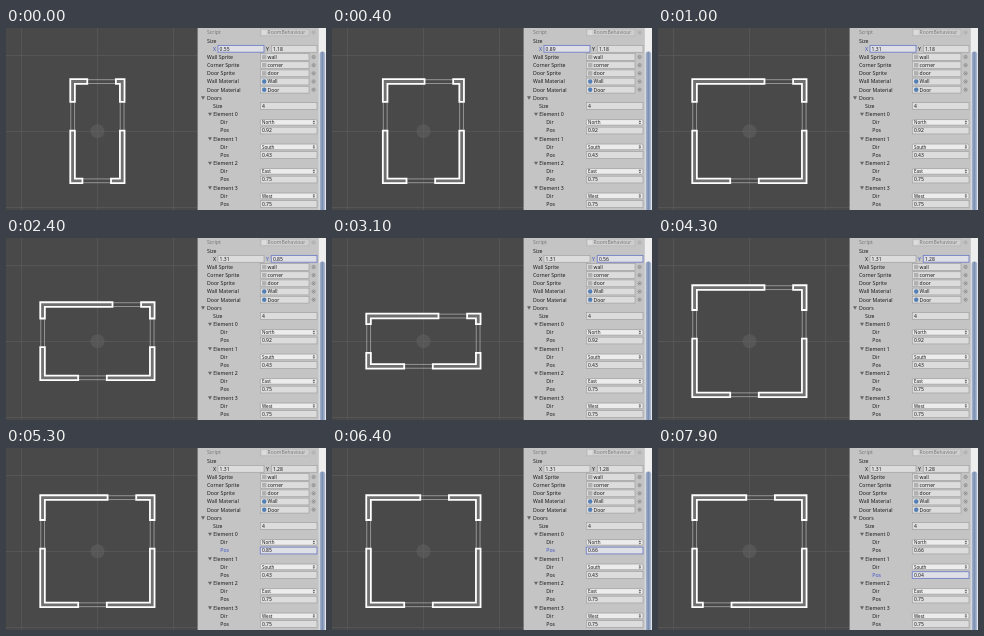
These frames come from a looping animation (320 px wide and 182 px high, 8000 ms). An HTML page:

```html
<!DOCTYPE html>
<html lang="en">
<head>
<meta charset="utf-8">
<title>Room editor</title>
<style>
html, body { margin: 0; height: 100%; overflow: hidden; background: #494949; }
svg { display: block; width: 320px; height: 182px; }
text { font: 5.2px "Noto Sans", "Open Sans", sans-serif; fill: #1c1c1c; }
text.value { font-size: 5px; }
text.mini { font-size: 4.5px; }
text.active { fill: #4458c8; }
.dim { opacity: .45; }
.field { fill: #dcdcdc; stroke: #9c9c9c; stroke-width: .6; }
.popup { fill: #ececec; stroke: #909090; stroke-width: .6; }
.focus { fill: #dfdfe6; stroke: #7b88c6; stroke-width: 1; }
.arrow { fill: #666; }
</style>
</head>
<body>
<svg id="stage" viewBox="0 0 320 182">
  <defs>
    <linearGradient id="thumb">
      <stop offset="0" stop-color="#a9b7d0"/>
      <stop offset=".5" stop-color="#7d8fb0"/>
      <stop offset="1" stop-color="#b4c3da"/>
    </linearGradient>
  </defs>
  <rect width="320" height="182" fill="#494949"/>
  <path d="M15.5 0V182M91.5 0V182M167.5 0V182M0 27.5H192M0 103.5H192M0 179.5H192" stroke="#595959" stroke-width=".8"/>
  <circle cx="91.5" cy="103.3" r="7" fill="#646464" opacity=".5"/>
  <path id="doors" fill="none" stroke="#a8a8a8" stroke-width=".8"/>
  <path id="walls" fill="#707070" stroke="#fff" stroke-width="1.8"/>
  <rect x="191.6" width="129" height="182" fill="#c4c4c4"/>
  <rect x="312.8" width="7.2" height="182" fill="#eee"/>
  <rect x="313.6" y="23.5" width="5.6" height="170" rx="2.8" fill="url(#thumb)"/>
  <g id="panel"></g>
</svg>
<script>
const LOOP = 8000, STEP = 100, RIGHT = 311;
const $ = id => document.getElementById(id);
const rowY = i => 4.5 + 8.17 * i;

function add(tag, attrs, content = '') {
  const el = document.createElementNS('http://www.w3.org/2000/svg', tag);
  for (const k in attrs) el.setAttribute(k, attrs[k]);
  el.textContent = content;
  return $('panel').appendChild(el);
}
const label = (x, row, s, cls = '') => add('text', { x, y: rowY(row) + 1.9, class: cls }, s);
const box = (x, row, right, cls = 'field', h = 6.8) =>
  add('rect', { x, y: rowY(row) - h / 2, width: right - x, height: h, rx: cls === 'popup' ? 1.5 : 0, class: cls });
const foldout = (x, row) => add('path', { d: `M${x} ${rowY(row) - 1.5}h4l-2 3.4z`, class: 'arrow' });

function input(x, row, right, value, name) {
  const rect = box(x, row, right);
  return { rect, name, text: label(x + 1.6, row, value, 'value') };
}

function objectRow(row, name, value, color, round = 0, cls = '') {
  label(201, row, name, cls);
  box(254.3, row, 303, 'field ' + cls);
  add('rect', { x: 256, y: rowY(row) - 2.2, width: 4.4, height: 4.4, rx: round, fill: color, class: cls });
  label(261.6, row, value, 'value ' + cls);
  add('circle', { cx: 307.6, cy: rowY(row), r: 1.6, fill: 'none', stroke: '#777', 'stroke-width': .6, class: cls });
  add('circle', { cx: 307.6, cy: rowY(row), r: .6, fill: '#777', class: cls });
}

objectRow(0, 'Script', 'RoomBehaviour', '#eee', 0, 'dim');
label(201, 1, 'Size');
const sizeX = input(212, 2, 258, '', label(207, 2, 'X'));
const sizeY = input(265.3, 2, RIGHT, '', label(260, 2, 'Y'));
objectRow(3, 'Wall Sprite', 'wall', '#b0b0b0');
objectRow(4, 'Corner Sprite', 'corner', '#b0b0b0');
objectRow(5, 'Door Sprite', 'door', '#b0b0b0');
objectRow(6, 'Wall Material', 'Wall', '#527fb5', 2.2);
objectRow(7, 'Door Material', 'Door', '#527fb5', 2.2);
foldout(195, 8);
label(201, 8, 'Doors');
label(207, 9, 'Size');
input(254.3, 9, RIGHT, '4');

const posFields = ['North', 'South', 'East', 'West'].map((dir, i) => {
  const row = 10 + 3 * i, y = rowY(row + 1);
  foldout(202, row);
  label(207.3, row, 'Element ' + i);
  label(214.3, row + 1, 'Dir');
  box(254.3, row + 1, RIGHT, 'popup', 5.6);
  label(256, row + 1, dir, 'mini');
  add('path', { d: `M306.6 ${y - .4}h2.6l-1.3 -1.7zM306.6 ${y + .4}h2.6l-1.3 1.7z`, class: 'arrow' });
  return input(254.3, row + 2, RIGHT, '0.75', label(214.3, row + 2, 'Pos'));
});
const fields = [sizeX, sizeY, posFields[0], posFields[1]];

// Each track is a list of [time, value], joined by straight lines
const tracks = [
  [[0, .55], [900, 1.31]],
  [[1700, 1.18], [1900, 1.13], [2400, .85], [2900, .54], [3100, .56], [3500, 1.2], [3900, 1.28]],
  [[5200, .92], [5300, .85], [5800, .2], [6100, .35], [6400, .66]],
  [[7500, .43], [7900, .04]]
];
const focusStarts = [0, 1800, 4900, 7400];

function sample(track, t) {
  const i = track.findIndex(k => k[0] > t);
  if (i < 0) return track[track.length - 1][1];
  if (i === 0) return track[0][1];
  const [t0, a] = track[i - 1], [t1, b] = track[i];
  return a + (b - a) * (t - t0) / (t1 - t0);
}

function drawRoom(w, h, north, south) {
  const cx = 91.4, cy = 103.2, unit = 79, thick = 4.6, half = 13.6;
  const hw = w * unit / 2 + 5.4, hh = h * unit / 2 + 5.4;
  const slot = (size, pos) => (pos - .5) * (size * unit - 33.5);
  const n = cx + slot(w, north), s = cx + slot(w, south), side = cy - slot(h, .75);
  let walls = '', doors = '';
  for (const sy of [-1, 1]) {
    const y = cy + sy * hh, yIn = y - sy * thick, mid = sy < 0 ? n : s;
    for (const d of [y - sy * .5, yIn + sy * .3]) doors += `M${mid - half} ${d}h${2 * half}`;
    for (const sx of [-1, 1]) {
      const x = cx + sx * hw, xIn = x - sx * thick;
      const xEnd = mid + sx * (half + .7), yEnd = side + sy * (half + .7);
      walls += `M${x} ${y}H${xEnd}V${yIn}H${xIn}V${yEnd}H${x}Z`;
    }
  }
  for (const sx of [-1, 1])
    for (const inset of [.5, thick - .3])
      doors += `M${cx + sx * (hw - inset)} ${side - half}v${2 * half}`;
  $('walls').setAttribute('d', walls);
  $('doors').setAttribute('d', doors);
}

function frame(now) {
  const t = Math.floor(now % LOOP / STEP) * STEP;
  const values = tracks.map(track => +sample(track, t).toFixed(2));
  const active = focusStarts.filter(start => start <= t).length - 1;
  fields.forEach((f, i) => {
    f.text.textContent = values[i];
    f.rect.setAttribute('class', i === active ? 'focus' : 'field');
    f.name.setAttribute('class', i === active ? 'active' : '');
  });
  drawRoom(...values);
  requestAnimationFrame(frame);
}
frame(0);
</script>
</body>
</html>
```
